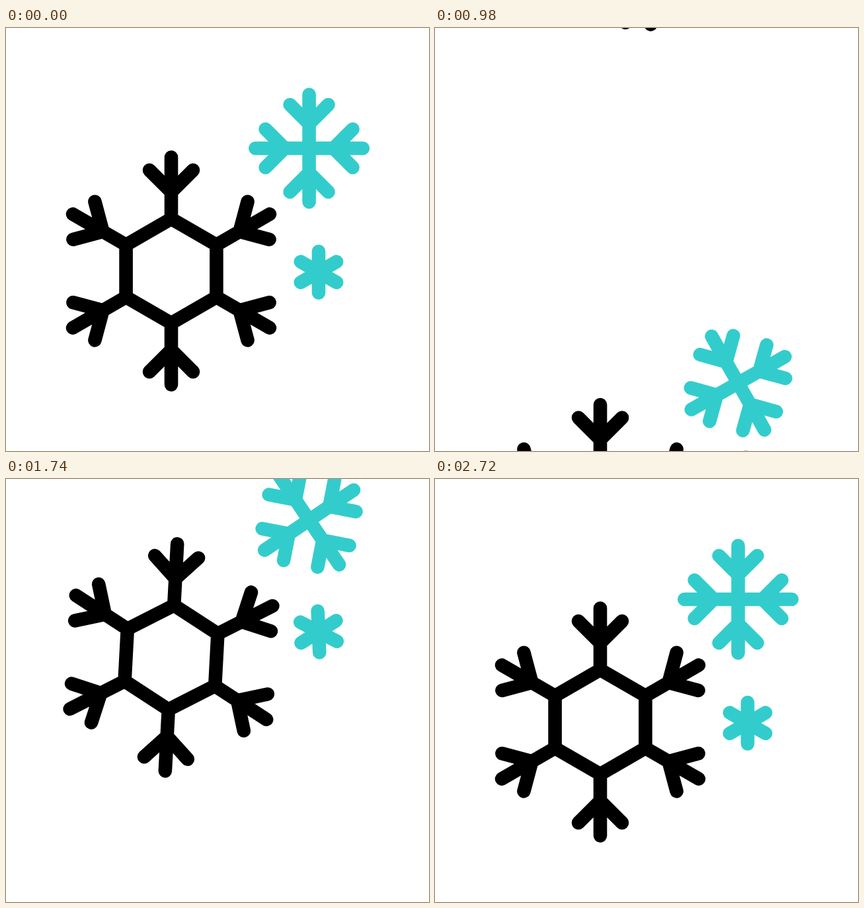
Animation, 640 px wide and 640 px high, one loop 3220 ms. Source, as an HTML page:

```html
<!DOCTYPE html>
<html lang="en">
<head>
<meta charset="utf-8">
<title>Falling snowflakes</title>
<style>
  html, body { margin: 0; width: 100%; height: 100%; overflow: hidden; background: #fff; }
  svg { display: block; width: 100%; height: 100%; }
</style>
</head>
<body>
<svg id="stage" viewBox="0 0 640 640" fill="none" stroke-width="20.6" stroke-linecap="round"></svg>
<script>
const LOOP = 3220, STEP = 20;
const stage = document.getElementById('stage');

// Arms start at `inner`; twigs of 45 degrees leave each arm at `fork`.
function flakePath({ arms, inner, length, fork, twig }) {
  let d = '';
  for (let i = 0; i < arms; i++) {
    const a = i * 2 * Math.PI / arms;
    const at = (x, r) =>
      (x * Math.cos(a) + r * Math.sin(a)).toFixed(2) + ' ' +
      (x * Math.sin(a) - r * Math.cos(a)).toFixed(2);
    d += `M${at(0, inner)}L${at(0, length)}`;
    if (twig) d += `M${at(-twig, fork + twig)}L${at(0, fork)}L${at(twig, fork + twig)}`;
  }
  if (inner) {
    const w = inner * Math.sqrt(3) / 2, h = inner / 2;
    d += `M0 ${-inner}L${w} ${-h}V${h}L0 ${inner}L${-w} ${h}V${-h}Z`;
  }
  return d;
}

// Cubic bezier easing (x1, 0, x2, 1), solved by bisection.
function ease(u, x1, x2) {
  let lo = 0, hi = 1, s = u;
  for (let i = 0; i < 24; i++) {
    s = (lo + hi) / 2;
    const x = 3 * x1 * s * (1 - s) ** 2 + 3 * x2 * s * s * (1 - s) + s ** 3;
    if (x < u) lo = s; else hi = s;
  }
  return s * s * (3 - 2 * s);
}

// Keys are [time, value, x1, x2]; the handles shape the way to the next key.
function valueAt(keys, t) {
  if (t <= keys[0][0]) return keys[0][1];
  for (let i = 1; i < keys.length; i++) {
    const [t0, v0, x1 = 1 / 3, x2 = 2 / 3] = keys[i - 1], [t1, v1] = keys[i];
    if (t < t1) return v0 + (v1 - v0) * ease((t - t0) / (t1 - t0), x1, x2);
  }
  return keys[keys.length - 1][1];
}

const flakes = [
  {
    color: '#000', x: 250, y: 367.6,
    shape: { arms: 6, inner: 79, length: 172, fork: 119.5, twig: 33 },
    leave: { drop: [[40, 0], [1540, 546]], turn: [[32, 0], [774, -65], [1984, 0]] },
    enter: { drop: [[666, -600], [2109, 0]], turn: [[620, 0], [1420, -62, .63, .47], [2620, 0]] }
  },
  {
    color: '#33cccc', x: 458.6, y: 182,
    shape: { arms: 4, inner: 0, length: 81.3, fork: 37, twig: 29 },
    leave: { drop: [[43, 0], [1691, 590]], turn: [[0, 0], [776, 65.5], [1986, 0]] },
    enter: { drop: [[918, -306], [2353, 0]], turn: [[546, 0], [1526, 62, .32, .576], [2720, 0]] }
  },
  {
    color: '#33cccc', x: 473, y: 369.3,
    shape: { arms: 6, inner: 0, length: 31.3 },
    leave: { drop: [[40, 0], [1460, 424]], turn: [[0, 0], [712, 64], [1922, 0]] },
    enter: { drop: [[576, -500], [2356, 0]], turn: [[480, 0], [1530, 62, .43, .42], [2700, 0]] }
  }
];

const layers = flakes.flatMap(({ color, x, y, shape, leave, enter }) =>
  [leave, enter].map(motion => {
    const node = document.createElementNS('http://www.w3.org/2000/svg', 'path');
    node.setAttribute('d', flakePath(shape));
    node.setAttribute('stroke', color);
    stage.append(node);
    return { node, x, y, ...motion };
  }));

function draw(now) {
  const t = Math.floor((now % LOOP) / STEP) * STEP;
  for (const { node, x, y, drop, turn } of layers) {
    const cy = y + valueAt(drop, t);
    node.setAttribute('transform', `translate(${x} ${cy}) rotate(${valueAt(turn, t)})`);
  }
}

const start = performance.now();
function tick() {
  draw(performance.now() - start);
  requestAnimationFrame(tick);
}
tick();
</script>
</body>
</html>
```
